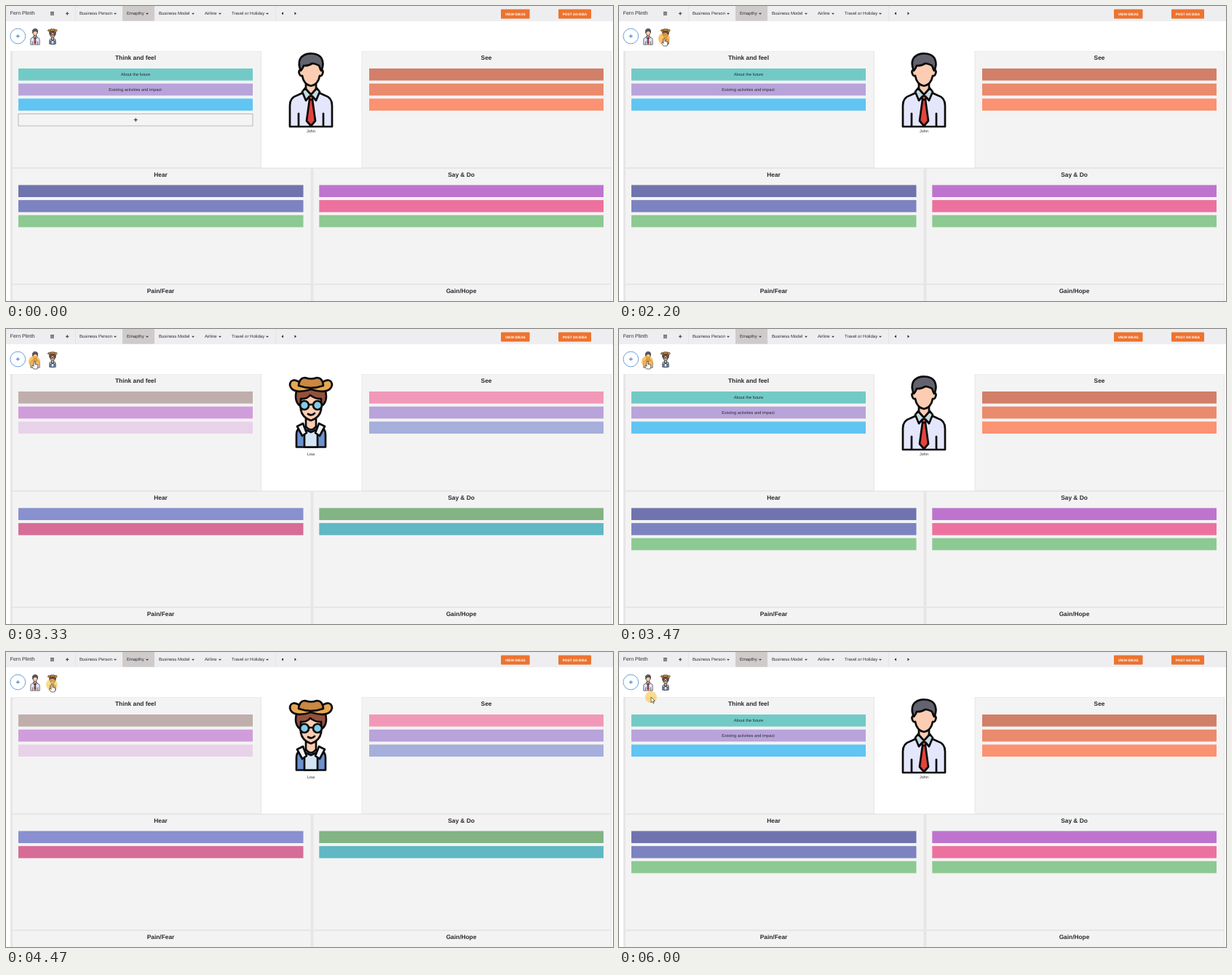
Animation of 834x406 px, one loop 6.07 s. Source, as an HTML page:

```html
<!DOCTYPE html>
<html lang="en">
<head>
<meta charset="utf-8">
<title>Persona board</title>
<style>
html, body { margin: 0; width: 100%; height: 100%; overflow: hidden; background: #fff; }
svg { display: block; width: 834px; height: 406px; }
text { font-family: "Liberation Sans", Arial, sans-serif; fill: #2b2b2f; text-rendering: geometricPrecision; }
.art { stroke: #0b0b0b; stroke-width: 2.7; stroke-linejoin: round; stroke-linecap: round; }
</style>
</head>
<body>
<svg id="stage" viewBox="0 0 834 406">
  <defs>
    <g id="johnArt" class="art">
      <path fill="#e4e7fb" d="M390 166V137Q390 126 400 123L411 118H427L438 123Q448 126 448 137V166Z"/>
      <path fill="none" d="M402 148V165M436 148V165"/>
      <path fill="#fccdb2" d="M412 104V116L419 124 426 116V104Z"/>
      <path fill="#e5433d" d="M417 129H421L425 158 419 165 413 158ZM415 122H423L421 129H417Z"/>
      <path fill="#c4dbe0" d="M411 113L419 122 412 130 407 118ZM427 113L419 122 426 130 431 118Z"/>
      <path fill="#fccdb2" d="M406 87Q401 88 403 93Q404 97 407 96Q409 108 419 110Q429 108 431 96Q434 97 435 93Q437 88 432 87V78H406Z"/>
      <path fill="#62636f" d="M405 89Q401 80 404 73Q409 65 420 65.5Q435 66 435.5 80Q435 86 433 89L430 82Q424 79 421 79Q414 83 409 82Q408 86 405 89Z"/>
    </g>
    <g id="lisaArt" class="art">
      <path fill="#6c91cf" d="M399 162.500V145Q399 137 407 135H431Q439 137 439 145V162.500Z"/>
      <path fill="#d3e5f4" d="M410 162.500V138L419 142 428 138V162.500Z"/>
      <path fill="#fccdb2" d="M412 122V134Q419 143 426 134V122Z"/>
      <path fill="#eef3f8" d="M408 130L400 134 407 147 413 143ZM430 130L438 134 431 147 425 143Z"/>
      <path fill="#94513d" d="M400 82Q395 98 403 105H435Q443 98 438 82Z"/>
      <path fill="#fccdb2" d="M405 96Q413 97 418 91Q426 97 433 96V111Q431 122 419 126Q407 122 405 111Z"/>
      <path fill="#e6a852" d="M390 77C391 66 401 72 404 73H434C437 72 447 66 448 77C446 88 431 87 419 83C407 87 392 88 390 77Z"/>
      <path fill="#c98843" d="M402 78Q403 67 411 67Q419 70 427 67Q435 67 436 78Q419 84 402 78Z"/>
      <path fill="none" d="M402 104H436M415 117Q420 120 424 116"/>
      <g fill="#82cbea"><circle cx="410" cy="105" r="6"/><circle cx="428" cy="105" r="6"/></g>
    </g>
  </defs>
  <g id="page"></g>
  <g id="cursor">
    <circle id="halo" r="8"/>
    <path id="arrow" fill="#fff" stroke="#333" stroke-width=".7" d="M0 0V7.500L1.700 6 3 8.700 4.300 8 3 5.500H5.400Z"/>
    <path id="hand" fill="#fff" stroke="#333" stroke-width=".7" d="M-1 0Q0-1 1 0V3.500L4 4.200Q5 4.500 5 6L4 10H-1L-3.500 6.500Q-3.500 5-2 5.500L-1 6.500Z"/>
  </g>
</svg>
<script>
const LOOP = 6070;
const el = id => document.getElementById(id);
const rect = (x, y, w, h, fill, extra = "") =>
  `<rect x="${x}" y="${y}" width="${w}" height="${h}" fill="${fill}" ${extra}/>`;
const label = (x, y, size, str, extra = "") =>
  `<text x="${x}" y="${y}" font-size="${size}" ${extra}>${str}</text>`;
const middle = (x, y, size, str, extra = "") =>
  label(x, y, size, str, `text-anchor="middle" ${extra}`);
const path = (d, extra) => `<path d="${d}" ${extra}/>`;

function navBar() {
  const items = [[101, "Business Person", 150], [166, "Emapthy", 194],
    [210, "Business Model", 257], [273, "Airline", 294], [310, "Travel or Holiday", 359]];
  const menu = items.map(([x, name, caret]) =>
    label(x, 12.3, 6, name) + path(`M${caret - 2} 9.700h4l-2 2z`, 'fill="#333"')).join("");
  const button = (x, w, name) => rect(x, 5, w, 13, "#d9d3cf", 'rx="1"') +
    rect(x, 4.5, w, 12.7, "#ed732f", 'rx="1"') +
    middle(x + w / 2, 12.5, 4.75, name, 'font-weight="bold" style="fill:#fff"');
  return rect(0, 0, 834, 21, "#eeeef0") + rect(160, 0, 44, 20.5, "#cfcbcb") +
    rect(95, 0, .6, 21, "#dedee1") + rect(370, 0, .6, 21, "#dedee1") +
    label(5.7, 12.3, 7, "Fern Plinth") + menu +
    path("M61 8.500h5M61 10.300h5M61 12.100h5M82 10.300h4.400M84.200 8.100v4.400", 'stroke="#333" fill="none"') +
    path("M381 8.300v4l-2.500-2zM396.500 8.300v4l2.500-2z", 'fill="#222"') +
    button(680, 39.5, "VIEW IDEAS") + button(759, 45, "POST AN IDEA");
}

function board() {
  const panels = [[9, 62.5, 341, 159.5, "Think and feel", 178], [489.5, 62.5, 341.5, 159.5, "See", 660],
    [9, 224, 409.5, 158, "Hear", 212.5], [422.5, 224, 408.5, 158, "Say &amp; Do", 625.5],
    [9, 384, 409.5, 22, "Pain/Fear", 212.5], [422.5, 384, 408.5, 22, "Gain/Hope", 625.5]];
  return rect(6, 62, 826, 344, "#e8e5e6") + rect(351, 62, 137.5, 160.5, "#fff") +
    panels.map(([x, y, w, h, name, cx]) => rect(x, y, w, h, "#f3f3f3") +
      middle(cx, y < 100 ? 74 : y + 10.5, 8.35, name, 'font-weight="bold"')).join("");
}

const thumb = (art, x) =>
  `<use href="#${art}" transform="translate(${x} 42) scale(.214) translate(-419 -115.500)"/>`;

function persona(id, name, think, see, hear, say) {
  const bars = (x, y, w, colors) =>
    colors.split(" ").map((c, i) => rect(x, y + i * 20.7, w, 16.6, "#" + c)).join("");
  return `<g id="${id}">` + bars(17, 86, 322, think) + bars(499, 86, 322, see) +
    bars(17, 246.4, 391.5, hear) + bars(430.3, 246.4, 390.7, say) +
    `<use href="#${id}Art"/>` + middle(419, 174.3, 5.5, name) +
    (id === "john" ? middle(178, 96.2, 5.7, "About the future") +
      middle(177.5, 117, 5.7, "Existing activities and impact") : "") + "</g>";
}

el("page").innerHTML = navBar() +
  '<circle cx="16.300" cy="41.500" r="10.400" fill="#fff" stroke="#5a93d2" stroke-width=".9"/>' +
  path("M13.800 41.500h5M16.300 39v5", 'stroke="#3f7fca"') +
  thumb("johnArt", 40) + thumb("lisaArt", 64) + board() +
  persona("john", "John", "72cac6 b8a4da 60c5f2", "d27f69 ea8b6d fb9272",
    "7074ae 7c83c0 8dc992", "be74ce ed719f 8dc992") +
  persona("lisa", "Lisa", "bfaeac d09ddb e8d2e9", "f198b8 b8a3da a6afdb",
    "8890cf d66c97", "82b484 5fb8c3") +
  '<g id="addRow">' + rect(17, 148.5, 322, 16.5, "#f4f4f4", 'stroke="#aaa" stroke-width=".8"') +
  path("M175.700 156.700h5M178.200 154.200v5", 'stroke="#222"') + "</g>";

// Pointer stops: time, x, y
const stops = [[70, 695, 11], [670, 85, 12], [870, 38, 46], [1400, 38, 46], [2000, 62, 45],
  [2600, 62, 45], [3200, 39, 45], [3480, 39, 45], [4050, 63, 45], [4700, 63, 45],
  [5250, 40, 46], [5500, 40, 46], [5950, 44, 62], [LOOP, 44, 62]];
const clicks = [2270, 3400, 4270, 5400];

function pointerAt(t) {
  const i = Math.max(1, stops.findIndex(s => s[0] > t));
  const [t0, x0, y0] = stops[i - 1], [t1, x1, y1] = stops[i];
  const p = Math.max(0, (t - t0) / (t1 - t0)), e = p * p * (3 - 2 * p);
  return [x0 + (x1 - x0) * e, y0 + (y1 - y0) * e];
}

const show = (id, on) => el(id).style.display = on ? "" : "none";

function draw(now) {
  const t = now % LOOP;
  const lisa = clicks.filter(c => t >= c).length % 2 === 1;
  const [x, y] = pointerAt(t);
  const over = y > 30 && y < 54 && (Math.abs(x - 40) < 7 || Math.abs(x - 64) < 7);
  const pressed = clicks.some(c => Math.abs(t - c) < 90);
  show("john", !lisa);
  show("lisa", lisa);
  show("addRow", t < 70);
  show("cursor", t >= 70);
  show("hand", over);
  show("arrow", !over);
  el("cursor").setAttribute("transform", `translate(${x} ${y})`);
  el("halo").setAttribute("fill", pressed ? "rgba(246,166,40,.7)" : "rgba(248,196,70,.62)");
  requestAnimationFrame(draw);
}
requestAnimationFrame(draw);
</script>
</body>
</html>
```
